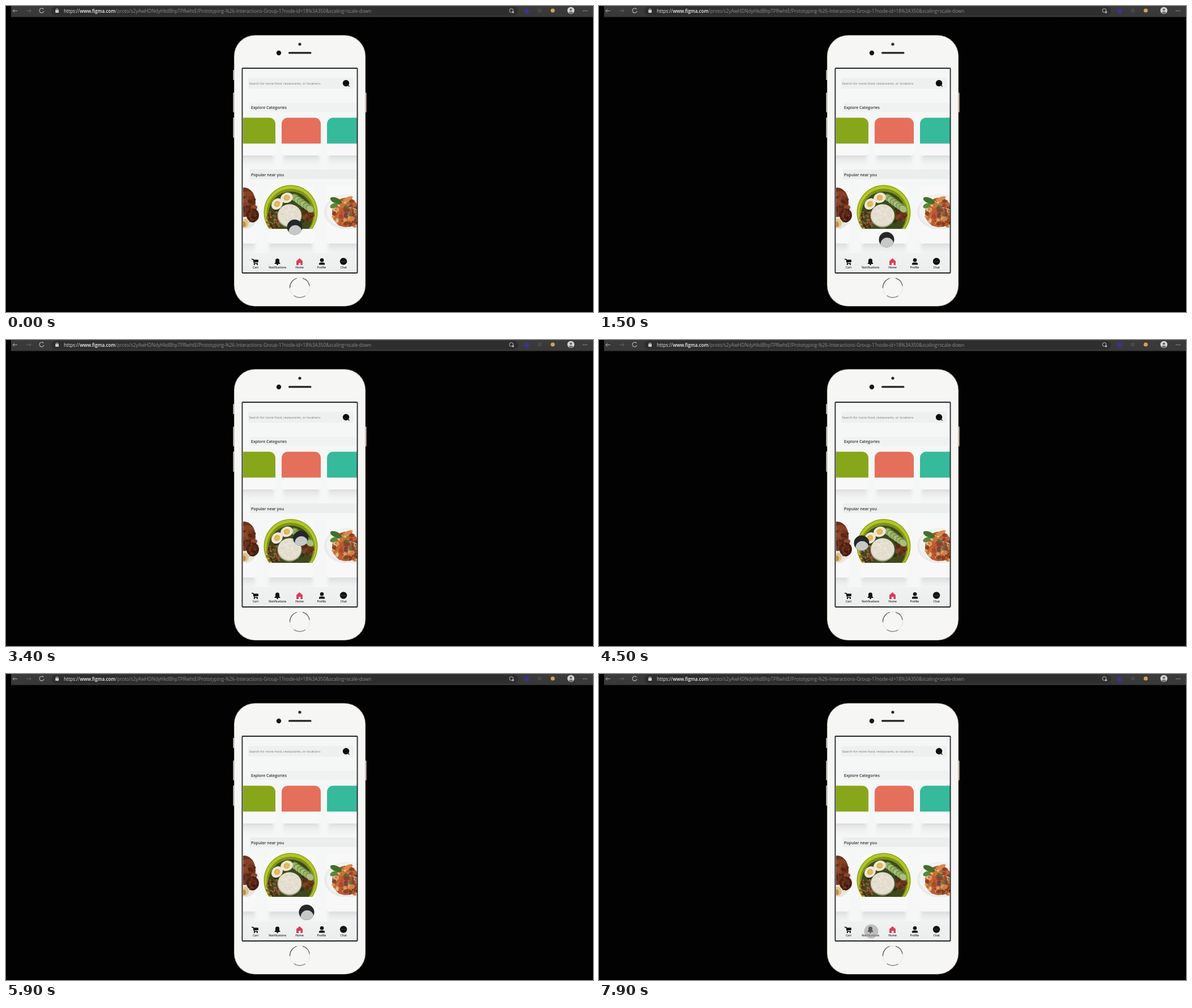
These frames come from a looping animation (1035x541 px, 8 s). An HTML page with a canvas:

```html
<!DOCTYPE html>
<html lang="en">
<head>
<meta charset="utf-8">
<title>Food app prototype</title>
<style>
html, body { margin: 0; width: 100%; height: 100%; overflow: hidden; background: #000; }
canvas { display: block; }
</style>
</head>
<body>
<canvas id="stage" width="1035" height="541"></canvas>
<script>
const W = 1035, H = 541, LOOP = 8000, STEP = 100;
const SOFT = 'blur(0.65px)';
const stage = document.getElementById('stage').getContext('2d');
const layer = () => Object.assign(document.createElement('canvas'), { width: W, height: H });
const sharp = layer(), still = layer();
const c = sharp.getContext('2d');

// Touch path: time, x, y
const path = [
  [0, 509, 391], [400, 526, 362], [700, 536, 330], [900, 536, 330],
  [1500, 507, 413], [1800, 589, 450], [2000, 525, 482], [2200, 439, 455],
  [2700, 439, 455], [3100, 474, 400], [3500, 535, 334], [3550, 535, 334],
  [3700, 475, 366], [3800, 475, 366], [4000, 506, 336], [4200, 449, 364],
  [4400, 449, 364], [4500, 463, 359], [4900, 476, 390], [5300, 449, 445],
  [5700, 526, 440], [6000, 532, 412], [6100, 532, 412], [6500, 492, 395],
  [7000, 492, 395], [7300, 508, 418], [7600, 450, 452], [7900, 480, 455], [8000, 480, 455]
];

function disc(g, x, y, r, fill) {
  g.beginPath();
  g.arc(x, y, r, 0, Math.PI * 2);
  g.fillStyle = fill;
  g.fill();
}

function oval(x, y, rx, ry, fill, turn = 0) {
  c.beginPath();
  c.ellipse(x, y, rx, ry, turn, 0, Math.PI * 2);
  c.fillStyle = fill;
  c.fill();
}

function box(x, y, w, h, fill, r = 0) {
  c.beginPath();
  c.roundRect(x, y, w, h, r);
  c.fillStyle = fill;
  c.fill();
}

function line(points, color, width = 1) {
  c.beginPath();
  points.forEach(([x, y]) => c.lineTo(x, y));
  c.strokeStyle = color;
  c.lineWidth = width;
  c.stroke();
}

function arc(x, y, r, from, to, color, width) {
  c.beginPath();
  c.arc(x, y, r, from, to);
  c.strokeStyle = color;
  c.lineWidth = width;
  c.stroke();
}

function label(str, x, y, font, fill, align = 'left') {
  c.font = font;
  c.fillStyle = fill;
  c.textAlign = align;
  c.textBaseline = 'alphabetic';
  c.fillText(str, x, y);
  return c.measureText(str).width;
}

function fade(x, y, w, h, from, to) {
  const g = c.createLinearGradient(0, y, 0, y + h);
  g.addColorStop(0, from);
  g.addColorStop(1, to);
  box(x, y, w, h, g);
}

function shadow(x, y, w, h) {
  c.save();
  c.filter = 'blur(2px)';
  fade(x + 3, y - 2, w - 6, h, '#d7dadb', 'rgba(240,242,242,0)');
  c.restore();
}

function clipped(x, y, w, h, draw) {
  c.save();
  c.beginPath();
  c.rect(x, y, w, h);
  c.clip();
  draw();
  c.restore();
}

function seeded(seed) {
  return () => (seed = seed * 16807 % 2147483647) / 2147483647;
}

// Scatter small bits of food inside an ellipse
function crumbs(n, x, y, rx, ry, size, colors, seed) {
  const rnd = seeded(seed);
  for (let i = 0; i < n; i++) {
    const a = rnd() * 6.283, d = Math.sqrt(rnd()), s = size * (0.6 + rnd() * 0.7);
    oval(x + Math.cos(a) * d * rx, y + Math.sin(a) * d * ry, s, s * 0.7,
      colors[Math.floor(rnd() * colors.length)], rnd() * 3);
  }
}

function browserBar() {
  fade(9, 0, W - 9, 19.5, '#3b3b3b', '#383838');
  box(80, 1, 823, 16, '#2e2e2e', 8);
  line([[20, 8.5], [12, 8.5], [15, 5.5]], '#aaa');
  line([[12, 8.5], [15, 11.5]], '#aaa');
  line([[36, 8.5], [44, 8.5], [41, 5.5]], '#666');
  line([[44, 8.5], [41, 11.5]], '#666');
  arc(63, 8, 4, 0.3, 5.6, '#bbb', 1.2);
  box(87, 7, 6, 5, '#ccc', 1);
  arc(90, 7, 2, Math.PI, 0, '#ccc', 1);

  let x = 102;
  const font = '8.25px "Open Sans", sans-serif';
  x += label('https://', x, 11.5, font, '#e6e6e6');
  x += label('www.figma.com', x, 11.5, '600 8.1px "Open Sans", sans-serif', '#f4f4f4');
  label('/proto/s2yAwHDNdyHkdBhpTPRwhtE/Prototyping-%26-Interactions-Group-1?node-id=18%3A350&scaling=scale-down',
    x, 11.5, font, '#8a8a8a');

  arc(891, 8, 3.2, 0, 6.283, '#aaa', 1.1);
  disc(c, 894, 11, 1.7, '#bbb');
  disc(c, 918, 9, 4.5, '#39358c');
  disc(c, 941, 8, 3.5, '#484848');
  disc(c, 964, 8, 3.6, '#d0a25a');
  disc(c, 996, 8, 6.2, '#d4d4d4');
  disc(c, 996, 6.5, 2.1, '#666');
  oval(996, 12, 3.6, 2.2, '#777');
  for (let i = 0; i < 3; i++) disc(c, 1018 + i * 3, 8.5, 0.8, '#bbb');
}

function phoneBody() {
  [[113, 18], [153, 35], [197, 36]].forEach(([y, h]) => box(400.5, y, 3, h, '#d8d2cb', 1));
  box(632, 153, 3.5, 35, '#d9c3b4', 1);
  box(402, 51.5, 232, 479.5, '#b9a898', 37);
  box(402.8, 52.3, 230.4, 478, '#f6f6f5', 36.5);
  disc(c, 518, 67.5, 2.6, '#2b2b2b');
  disc(c, 481, 83, 4.2, '#161616');
  box(498, 81.3, 40.5, 3.2, '#222', 1.5);
  arc(518, 498, 17.5, 0, 6.283, '#e2e2e1', 1);
  arc(518, 498, 17.5, 3.1, 4.4, '#686868', 1.5);
  arc(518, 498, 17.5, 5, 6.1, '#777', 1.5);
  arc(518, 498, 17.5, 1.0, 2.2, '#888', 1.5);
}

function categories() {
  [[405, 70, '#87a619'], [486, 69, '#e4705c'], [566, 70, '#35ba9b']].forEach(([x, w, color]) => {
    shadow(x, 265, w, 22);
    box(x, 238, w, 27, '#f8f8f8', [0, 0, 7, 7]);
    line([[x + 6, 265], [x + w - 6, 265]], '#d3d5d5');
    box(x, 197.5, w, 45.5, color, [11, 11, 0, 0]);
    line([[x, 243.5], [x + w, 243.5]], '#dcdedb');
  });
}

function riceBowl() {
  oval(502, 365, 47.5, 48.5, '#8aa218');
  oval(502, 365, 46, 47, '#b3c624');
  oval(502, 367, 42.5, 44, '#7c931c');
  oval(502, 369, 39.5, 41, '#3d4a1b');
  crumbs(55, 502, 370, 34, 32, 4, ['#33401b', '#48551f', '#41481c', '#2c3816'], 12);
  crumbs(95, 472, 378, 13, 15, 2.2, ['#5a371c', '#805632', '#40260f', '#93683c'], 41);
  crumbs(55, 533, 368, 9, 13, 3, ['#69351b', '#572a14', '#7b4525'], 33);
  for (let i = 0; i < 6; i++) {
    const x = 510 + i * 5.2, y = 339 + i * 3.8;
    oval(x, y, 8, 6.5, '#708d3c', 0.6);
    oval(x, y + 0.7, 7, 5.4, i % 2 ? '#a9bd82' : '#9bb56d', 0.6);
  }
  [[495, 339, -0.3], [478, 350, -0.8]].forEach(([x, y, turn]) => {
    oval(x, y, 11, 9, '#ece7d7', turn);
    oval(x, y, 5.5, 5, '#dfae45', turn);
    oval(x + 0.5, y, 3.6, 3.1, '#e6bd5b', turn);
  });
  oval(500, 371, 21.5, 20.5, '#a4a087');
  oval(500, 370, 20.5, 19.5, '#e3decf');
  crumbs(85, 500, 368, 18, 16, 1.5, ['#eeeade', '#dcd6c6', '#e8e3d6'], 8);
}

function sideDishes() {
  oval(416, 365, 30, 31, '#e7e6e2');
  oval(420, 347, 20, 26, '#6d321e');
  oval(424, 342, 14, 15, '#894126', 0.5);
  crumbs(40, 424, 349, 17, 22, 4, ['#562716', '#77391e', '#8d4829', '#622b19'], 70);
  oval(435, 370, 11, 12, '#4c2112');
  crumbs(32, 435, 371, 8, 10, 2.3, ['#5f2b18', '#733820', '#40190c'], 91);
  oval(421, 384, 7, 8, '#dfc38b');
  oval(419, 386, 4, 5, '#c58c3c');

  oval(601, 364, 40, 31, '#e9eaea');
  oval(603, 363, 38, 29, '#f4f3f1');
  oval(599, 365, 24, 26, '#b96033');
  crumbs(115, 600, 365, 24, 25, 4, ['#c97237', '#ab4a2a', '#d99a58', '#87442a', '#bd5c32', '#e0b886'], 54);
  crumbs(13, 603, 356, 17, 18, 2.8, ['#5c6f3a', '#704353'], 19);
  oval(582, 344, 11, 5, '#407128', 0.4);
  oval(578, 353, 7, 4, '#5a8838', -0.4);
  oval(603, 341, 9, 3.5, '#d98a48', -0.4);
  crumbs(25, 612, 382, 8, 8, 3, ['#803b21', '#b0562f', '#cd8341'], 44);
}

function popular() {
  [[400, 42], [461, 83], [565, 70]].forEach(([x, w]) => {
    shadow(x, 421, w, 24);
    box(x, 317, w, 104, '#f8f8f8', 8);
    line([[x + 6, 420.5], [x + w - 6, 420.5]], '#d8dada');
  });
  clipped(418, 315, 201, 79, () => {
    riceBowl();
    sideDishes();
  });
}

function navBar() {
  fade(418, 437, 201, 34, '#f0f2f2', '#eceeee');
  const names = ['Cart', 'Notifications', 'Home', 'Profile', 'Chat'];
  names.forEach((name, i) =>
    label(name, 440 + i * 38.8, 463.5, '600 5px "Open Sans", sans-serif', '#222', 'center'));

  line([[433, 447.5], [436, 448], [438, 455], [444, 455]], '#111', 1.5);
  box(436, 448.5, 9, 4.5, '#111', 1);
  disc(c, 438, 456.7, 1.2, '#111');
  disc(c, 443, 456.7, 1.2, '#111');

  box(475, 446.5, 7, 9, '#111', [4, 4, 0, 0]);
  box(473.5, 454, 10, 2, '#111', 1);
  disc(c, 478.5, 457, 1.3, '#111');

  c.beginPath();
  [[512, 451], [517.5, 446], [523, 451], [523, 458], [519.5, 458],
    [519.5, 454], [516, 454], [516, 458], [512, 458]].forEach(([x, y]) => c.lineTo(x, y));
  c.fillStyle = '#df3c55';
  c.fill();

  disc(c, 557, 449.2, 3.3, '#111');
  box(551.8, 453.6, 10.4, 4, '#111', [4, 4, 1, 1]);

  disc(c, 595, 451.5, 6.2, '#111');
  for (let i = -1; i < 2; i++) disc(c, 595 + i * 2.6, 451.5, 0.6, '#888');
}

function appScreen() {
  box(417, 110, 203, 362, '#f5f6f6');
  clipped(418, 111, 201, 360, () => {
    box(427, 127, 186, 19, '#edf0ef', 3);
    label('Search for more food, restaurants, or locations', 428.5, 139,
      '5.8px "Open Sans", sans-serif', '#747777');
    disc(c, 599.5, 136.5, 5.7, '#0c0c0c');
    line([[602, 139], [605.5, 142.5]], '#222', 1.5);

    box(430, 171, 188, 16, '#f0f2f2');
    label('Explore Categories', 432, 182, '600 7px "Open Sans", sans-serif', '#303030');
    categories();
    box(430, 289, 188, 17, '#eceeee');
    label('Popular near you', 432, 300.5, '600 7px "Open Sans", sans-serif', '#303030');
    popular();
    navBar();
  });
  c.strokeStyle = '#232526';
  c.lineWidth = 1.8;
  c.beginPath();
  c.roundRect(416.5, 110, 203, 362, 1);
  c.stroke();
}

function touchAt(t) {
  const i = Math.max(1, path.findIndex(p => p[0] > t));
  const [t0, x0, y0] = path[i - 1], [t1, x1, y1] = path[i];
  const k = (t - t0) / (t1 - t0);
  return [x0 + (x1 - x0) * k, y0 + (y1 - y0) * k];
}

function drawTouch(t) {
  const [x, y] = touchAt(t);
  stage.save();
  stage.filter = SOFT;
  if (t >= 6200) {
    disc(stage, x, y, 12.5, 'rgba(150,150,148,.55)');
  } else {
    disc(stage, x, y, 13.5, '#252728');
    stage.beginPath();
    stage.arc(x, y, 13.5, 0, Math.PI * 2);
    stage.clip();
    disc(stage, x + 1, y + 8, 11.5, '#c6c8c8');
  }
  stage.restore();
}

c.fillStyle = '#020202';
c.fillRect(0, 0, W, H);
browserBar();
phoneBody();
appScreen();

// Soften the whole scene once, like a video still
const s = still.getContext('2d');
s.drawImage(sharp, 0, 0);
s.filter = SOFT;
s.drawImage(sharp, 0, 0);

const start = performance.now();
function frame() {
  const t = Math.floor((performance.now() - start) % LOOP / STEP) * STEP;
  stage.drawImage(still, 0, 0);
  drawTouch(t);
  requestAnimationFrame(frame);
}
frame();
</script>
</body>
</html>
```
